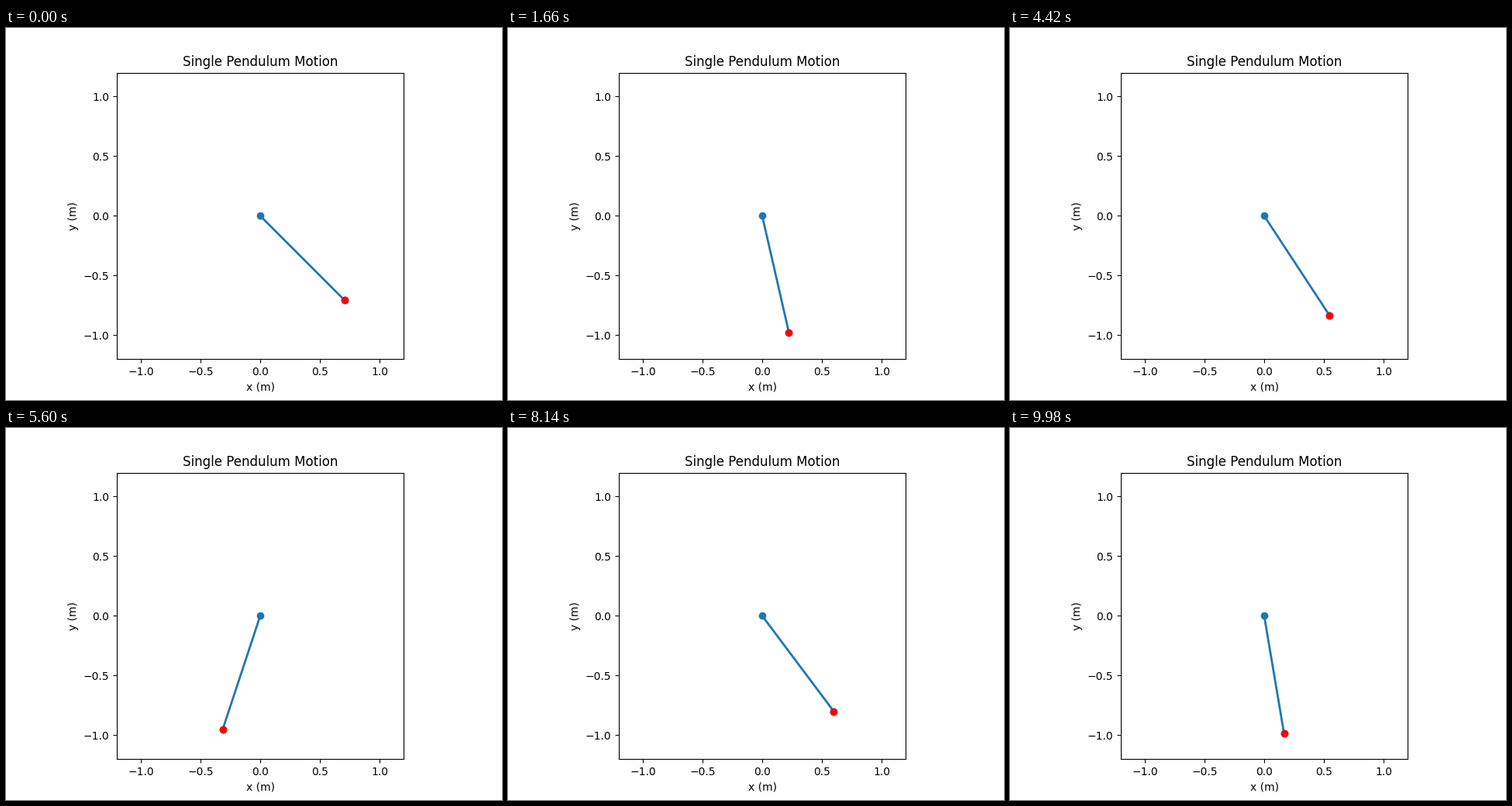
Recreate the animation shown at these times as a matplotlib script. Size 640 px wide and 480 px high, loop 10000 ms.

```python
import numpy as np
import matplotlib.pyplot as plt
from matplotlib.animation import FuncAnimation

G = 9.81
LENGTH = 1.0
STEP = 0.02
FRAMES = 500


def slope(state):
    angle, speed = state
    return np.array([speed, -G / LENGTH * np.sin(angle)])


def rk4(state, h):
    k1 = slope(state)
    k2 = slope(state + h / 2 * k1)
    k3 = slope(state + h / 2 * k2)
    k4 = slope(state + h * k3)
    return state + h / 6 * (k1 + 2 * k2 + 2 * k3 + k4)


def swing(start, count):
    state = np.array([start, 0.0])
    angles = []
    for _ in range(count):
        angles.append(state[0])
        state = rk4(state, STEP)
    return np.array(angles)


theta = swing(np.pi / 4, FRAMES)
xs = LENGTH * np.sin(theta)
ys = -LENGTH * np.cos(theta)

fig, ax = plt.subplots(figsize=(6.4, 4.8), dpi=100)
ax.set_xlim(-1.2, 1.2)
ax.set_ylim(-1.2, 1.2)
ax.set_aspect("equal")
ax.set_xlabel("x (m)")
ax.set_ylabel("y (m)")
ax.set_title("Single Pendulum Motion")

rod, = ax.plot([], [], "o-", lw=2)
bob, = ax.plot([], [], "ro")


def update(i):
    rod.set_data([0, xs[i]], [0, ys[i]])
    bob.set_data([xs[i]], [ys[i]])
    return rod, bob


anim = FuncAnimation(fig, update, frames=FRAMES, interval=1000 * STEP,
                     blit=True, repeat=True)
plt.show()
```
